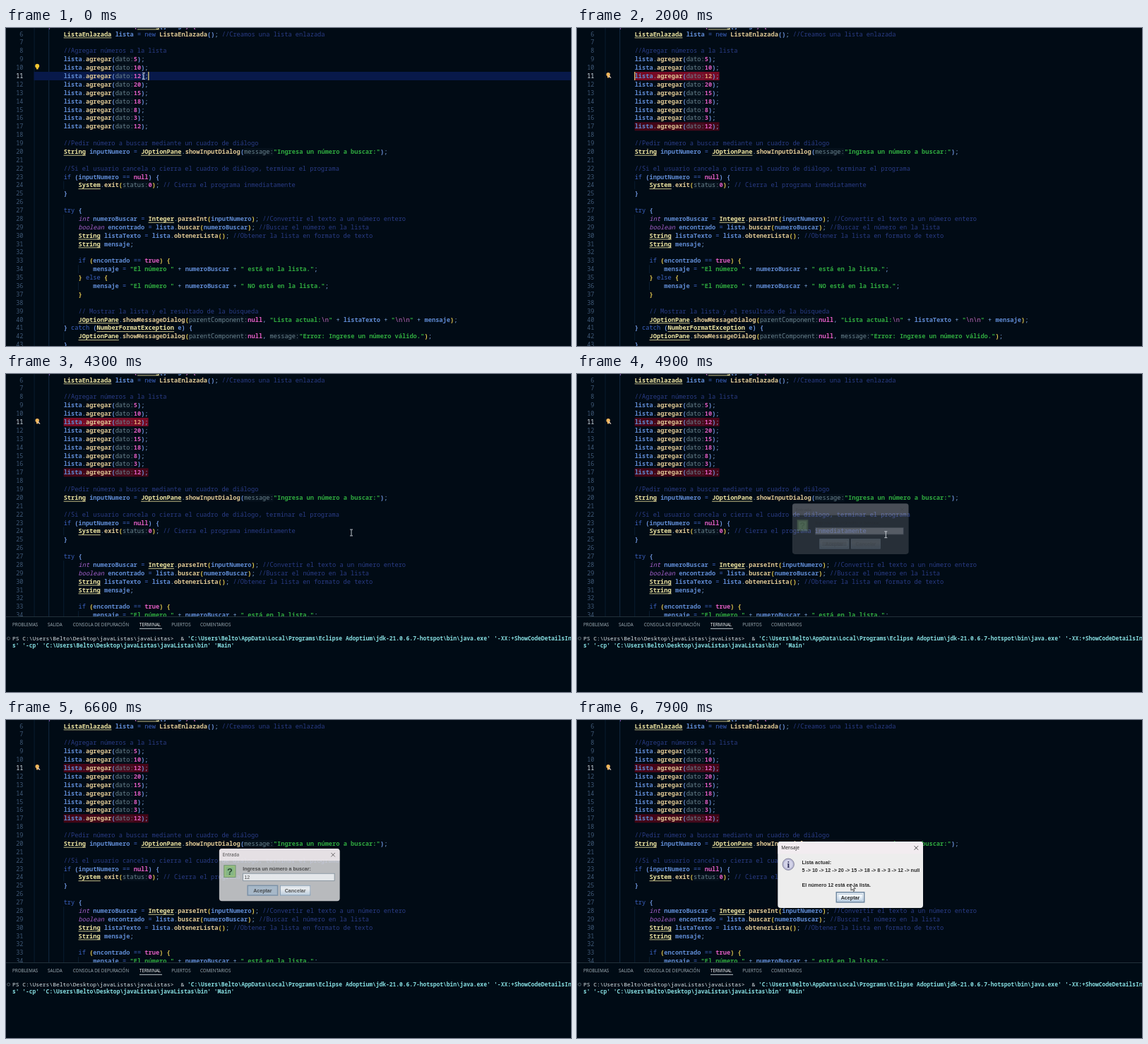
Write an HTML page with a canvas that moves like this. It is 800x450 px and loops after 8 s.

```html
<!DOCTYPE html>
<html lang="es">
<head>
<meta charset="utf-8">
<title>Lista enlazada</title>
<style>
html, body { margin: 0; width: 100%; height: 100%; overflow: hidden; background: #010b15; }
canvas { display: block; width: 800px; height: 450px; }
</style>
</head>
<body>
<canvas id="stage" width="800" height="450"></canvas>
<script>
const ctx = document.getElementById('stage').getContext('2d');
const LOOP = 8000, CW = 5.213, LH = 11.88, LEFT = 60.8, FIRST = 5;
const MONO = '"Noto Sans Mono", "DejaVu Sans Mono", monospace';
const UI = '"Open Sans", "Noto Sans", sans-serif';
const ARIAL = '"Liberation Sans", Arial, sans-serif';

const C = {
  comment: '#2a3c86', str: '#2fa83f', esc: '#c66fc4', hint: '#6b8590', num: '#dd5cc0',
  kw: '#3c62c0', type: '#f0e6a2', decl: '#a862cf', fn: '#dfc794', name: '#5f8ad2',
  op: '#7ba6dd', brackets: ['#e8cd50', '#d070cc', '#6f97e0']
};

// Inlay hints sit between « and ».
const code = `public static void main(String[] args) {
    ListaEnlazada lista = new ListaEnlazada(); //Creamos una lista enlazada

    //Agregar números a la lista
    lista.agregar(«dato:»5);
    lista.agregar(«dato:»10);
    lista.agregar(«dato:»12);
    lista.agregar(«dato:»20);
    lista.agregar(«dato:»15);
    lista.agregar(«dato:»18);
    lista.agregar(«dato:»8);
    lista.agregar(«dato:»3);
    lista.agregar(«dato:»12);

    //Pedir número a buscar mediante un cuadro de diálogo
    String inputNumero = JOptionPane.showInputDialog(«message:»"Ingresa un número a buscar:");

    //Si el usuario cancela o cierra el cuadro de diálogo, terminar el programa
    if (inputNumero == null) {
        System.exit(«status:»0); // Cierra el programa inmediatamente
    }

    try {
        int numeroBuscar = Integer.parseInt(inputNumero); //Convertir el texto a un número entero
        boolean encontrado = lista.buscar(numeroBuscar); //Buscar el número en la lista
        String listaTexto = lista.obtenerLista(); //Obtener la lista en formato de texto
        String mensaje;

        if (encontrado == true) {
            mensaje = "El número " + numeroBuscar + " está en la lista.";
        } else {
            mensaje = "El número " + numeroBuscar + " NO está en la lista.";
        }

        // Mostrar la lista y el resultado de la búsqueda
        JOptionPane.showMessageDialog(«parentComponent:»null, "Lista actual:\\n" + listaTexto + "\\n\\n" + mensaje);
    } catch (NumberFormatException e) {
        JOptionPane.showMessageDialog(«parentComponent:»null, «message:»"Error: Ingrese un número válido.");
    }`.split('\n');

function kind(s, next) {
  if (s.startsWith('//')) return 'comment';
  if (s[0] === '«') return 'hint';
  if (s[0] === '\\') return 'esc';
  if (/^\d|^(null|true)$/.test(s)) return 'num';
  if (/^(new|try|catch|if|else|=)$/.test(s)) return 'kw';
  if (/^(int|boolean|public|static|void)$/.test(s)) return 'decl';
  if (/^\w/.test(s)) return next === '(' ? 'fn' : /^[A-Z]/.test(s) ? 'type' : 'name';
  return /[(){}[\]]/.test(s) ? 'bracket' : 'op';
}

let depth = 1;
function tokenize(line) {
  const out = [];
  let col = 0, quoted = false;
  for (const m of line.matchAll(/\/\/.*|«[^»]*»|\\n|"|[\wáéíóúñ]+|\s+|./g)) {
    const raw = m[0], s = raw.replace(/[«»]/g, '');
    let k = kind(raw, line[m.index + raw.length]);
    if (raw === '"') { k = 'str'; quoted = !quoted; }
    else if (quoted && k !== 'esc') k = 'str';
    let color = C[k];
    if (k === 'bracket') {
      if (/[)}\]]/.test(s)) depth--;
      color = C.brackets[depth % 3];
      if (/[({[]/.test(s)) depth++;
    }
    const last = out[out.length - 1];
    if (last && k === 'str' && last.k === 'str') last.s += s;
    else if (s.trim()) out.push({ s, k, col, color });
    col += s.length;
  }
  return out;
}
const rows = code.map(tokenize);

const clamp = (v, a = 0, b = 1) => Math.min(b, Math.max(a, v));
const ease = p => p * p * (3 - 2 * p);
const ramp = (t, a, b) => ease(clamp((t - a) / (b - a)));
const lineY = n => 8.6 + (n - 6) * LH;

function rect(x, y, w, h, fill) { ctx.fillStyle = fill; ctx.fillRect(x, y, w, h); }
function text(s, x, y, font, fill, align = 'left') {
  ctx.font = font; ctx.fillStyle = fill; ctx.textAlign = align;
  ctx.fillText(s, x, y);
}
function path(points, stroke, width = 1, fill) {
  ctx.beginPath();
  points.forEach(([x, y], i) => i ? ctx.lineTo(x, y) : ctx.moveTo(x, y));
  if (fill) { ctx.closePath(); ctx.fillStyle = fill; ctx.fill(); }
  ctx.strokeStyle = stroke; ctx.lineWidth = width; ctx.stroke();
}
function circle(x, y, r, fill, stroke) {
  ctx.beginPath(); ctx.arc(x, y, r, 0, 7);
  if (fill) { ctx.fillStyle = fill; ctx.fill(); }
  if (stroke) { ctx.strokeStyle = stroke; ctx.lineWidth = 0.8; ctx.stroke(); }
}

function bulb(y, fix) {
  const fill = fix ? '#efb45a' : '#f2c531';
  circle(44.2, y - 1.3, fix ? 2.7 : 3, fill);
  rect(43, y + 1, 2.6, 2.4, fill);
  if (fix) path([[44.8, y + 0.2], [48, y + 3.6]], '#e9d3c4', 1.3);
}

function guides() {
  rect(39.6, 0, 0.9, 450, '#0b2034');
  rect(60.3, 0, 0.9, 450, '#16304a');
  const span = (x, a, b) => rect(x, lineY(a) - LH / 2, 0.8, (b - a + 1) * LH, '#0d2237');
  span(81.4, 24, 24); span(81.4, 28, 40); span(81.4, 42, 42);
  span(102.2, 34, 34); span(102.2, 36, 36);
}

function editor(t) {
  const x0 = LEFT + 4 * CW, x1 = x0 + 23 * CW;
  const cols = Math.round(23 * ramp(t, 200, 550));
  const y11 = lineY(11) - 6, focused = t < 4900;
  guides();
  if (!cols) {
    rect(39.6, y11, 760.4, 12, '#08194a');
  } else {
    rect(x1 - cols * CW, y11, cols * CW, 12, focused ? '#770a24' : '#470518');
    if (cols === 23) rect(x0, lineY(17) - 6, x1 - x0, 12, '#430517');
  }
  rows.forEach((row, i) => {
    const n = i + FIRST, y = lineY(n) + 3;
    text(n, 24.5, y, '8.6px ' + MONO, n === 11 ? '#e4ecf4' : '#3f5876', 'right');
    for (const { s, k, col, color } of row) {
      const x = LEFT + col * CW, w = s.length * CW;
      if (k === 'hint') rect(x, y - 8, w, 10.5, 'rgba(100,140,160,.05)');
      const style = k === 'decl' ? 'italic ' : /type|fn|name|num|bracket|str/.test(k) ? 'bold ' : '';
      const lit = n === 11 && k === 'num' && cols && focused;
      text(s, x, y, style + '8.68px ' + MONO, lit ? '#dba074' : color);
      if (k === 'type') rect(x, y + 1.8, w, 0.9, '#d8cf92');
    }
  });
  bulb(cols ? 67 : 55, cols > 0);
  if (!cols) rect(x1 - 0.3, y11, 1.2, 12, '#e8d47a');
  else if (focused && (t < 550 || Math.floor((t - 550) / 530) % 2 === 0))
    rect(x1 - cols * CW - 0.5, y11, 1.2, 12, '#e8d47a');
}

const tabs = [['PROBLEMAS', 9], ['SALIDA', 59], ['CONSOLA DE DEPURACIÓN', 94.7],
  ['TERMINAL', 189], ['PUERTOS', 234.3], ['COMENTARIOS', 275]];

function panel(t) {
  if (t < 2800) return;
  rect(0, 343, 800, 107, '#000b15');
  rect(0, 343, 800, 0.9, '#27363f');
  for (const [s, x] of tabs)
    text(s, x, 356.7, '6.25px ' + UI, s === 'TERMINAL' ? '#ffffff' : '#a3b0b8');
  rect(189, 359.8, 32, 0.9, '#d5dde2');
  if (t < 3700) return;
  const font = '7.95px ' + MONO, w = 4.77, home = 'C:\\Users\\Belto\\';
  circle(3.6, 374.2, 2, null, '#66747c');
  text('PS ' + home + 'Desktop\\javaListas\\javaListas>', 9, 377, font, '#dbe4e8');
  if (t < 3900) { rect(9 + 49 * w, 369.5, 4.5, 9, '#9fb0b8'); return; }
  const run = (s, col, y) => text(s, 9 + col * w, y, 'bold ' + font, '#86dde0');
  text('&', 9 + 50 * w, 377, font, '#dbe4e8');
  run("'" + home + "AppData\\Local\\Programs\\Eclipse Adoptium\\jdk-21.0.6.7-hotspot\\bin\\java.exe'", 52, 377);
  run("'-XX:+ShowCodeDetailsInExceptionMessage", 143, 377);
  run("s' '-cp' '" + home + "Desktop\\javaListas\\javaListas\\bin' 'Main'", 0, 387);
}

function windowBox(x, y, w, h, title) {
  ctx.beginPath(); ctx.roundRect(x, y, w, h, 4);
  ctx.fillStyle = '#ededed'; ctx.fill();
  ctx.save(); ctx.clip();
  rect(x, y, w, 17.5, '#f2ecf0');
  ctx.restore();
  text(title, x + 5, y + 11.3, '6.5px ' + UI, '#111');
  const cx = x + w - 9.7, cy = y + 9;
  path([[cx - 2.8, cy - 2.8], [cx + 2.8, cy + 2.8]], '#222', 0.8);
  path([[cx + 2.8, cy - 2.8], [cx - 2.8, cy + 2.8]], '#222', 0.8);
}

function button(label, x, y, w, main, pressed) {
  const g = ctx.createLinearGradient(0, y, 0, y + 15);
  g.addColorStop(0, '#dfeaf4'); g.addColorStop(0.35, '#f6fafd'); g.addColorStop(1, '#b8cfe5');
  rect(x, y, w, 15, pressed ? '#a3b8cc' : g);
  ctx.strokeStyle = '#7088a0'; ctx.lineWidth = main ? 1.5 : 0.9;
  ctx.strokeRect(x + 0.5, y + 0.5, w - 1, 14);
  if (main) { ctx.strokeStyle = '#a4b8cb'; ctx.lineWidth = 0.6; ctx.strokeRect(x + 3, y + 3, w - 6, 9); }
  text(label, x + w / 2, y + 10.2, 'bold 7.15px ' + ARIAL, '#2a2a2a', 'center');
}

// Draws inside a fading, slightly shrinking frame centred on (cx, cy).
function faded(alpha, scale, cx, cy, draw) {
  ctx.save();
  ctx.globalAlpha = alpha;
  ctx.translate(cx, cy); ctx.scale(scale, scale); ctx.translate(-cx, -cy);
  draw();
  ctx.restore();
}

function inputDialog(t) {
  if (t < 4850 || t >= 6700) return;
  const shown = ramp(t, 4850, 5050), gone = clamp((t - 6520) / 180);
  faded(shown * (1 - 0.5 * gone), (0.94 + 0.06 * shown) * (1 - 0.035 * gone), 387.2, 219, () => {
    windowBox(300.5, 181.3, 173.5, 75.5, 'Entrada');
    rect(307, 205, 17.5, 18, '#568a5c');
    rect(308, 206, 15.5, 16, '#a6cb84');
    rect(310, 208, 11.5, 12, '#80b588');
    text('?', 315.8, 218.8, 'bold 13px ' + ARIAL, '#10261a', 'center');
    text('Ingresa un número a buscar:', 334.5, 212.8, 'bold 7.15px ' + ARIAL, '#2a2a2a');
    rect(334.3, 216.8, 132.5, 11.2, '#7a8a99');
    rect(335.2, 217.7, 130.7, 9.4, '#fff');
    const typed = t < 5400 ? '' : t < 5750 ? '1' : '12';
    text(typed, 336.6, 225.3, '7.15px ' + ARIAL, '#222');
    if (t < 6400 && Math.floor((t - 4900) / 500) % 2 === (t < 5400 ? 0 : 1))
      rect(337 + typed.length * 3.98, 218.6, 0.8, 8, '#222');
    button('Aceptar', 341, 234, 44, true, t > 6400);
    button('Cancelar', 388, 234, 44);
  });
}

function messageDialog(t) {
  if (t < 6700) return;
  const p = ramp(t, 6700, 6950), font = 'bold 7.15px ' + ARIAL;
  faded(p, 0.94 + 0.06 * p, 387, 219, () => {
    windowBox(284.3, 172, 205.7, 94, 'Mensaje');
    circle(299.2, 204.2, 8.2, '#b9b9d6', '#77778f');
    circle(299.2, 204.2, 6.2, '#d3d3e8');
    text('i', 299.2, 208.8, 'bold 13px "Liberation Serif", serif', '#2c2c58', 'center');
    text('Lista actual:', 318.4, 203.6, font, '#2a2a2a');
    text('5 -> 10 -> 12 -> 20 -> 15 -> 18 -> 8 -> 3 -> 12 -> null', 318.4, 214.6, font, '#2a2a2a');
    text('El número 12 está en la lista.', 318.4, 236.4, font, '#2a2a2a');
    button('Aceptar', 366.8, 243.3, 40.4, true);
  });
}

// time, x, y
const track = [[0, 195, 68], [200, 201, 68], [550, 82, 68], [650, 85, 68], [1000, 245, 69],
  [1250, 250, 69], [1900, 600, -14], [2700, 600, -14], [3000, 549, 164], [3500, 520, 200],
  [4200, 489, 224.5], [4500, 489, 224.5], [5300, 386, 230], [5800, 386, 230],
  [6300, 366, 238], [6650, 366, 238], [7500, 388, 232], [8000, 388, 232]];

function pointer(t) {
  // Hidden while one dialog gives way to the next.
  if (t > 6520 && t < 6700) return;
  const i = track.findIndex(k => k[0] > t), a = track[i - 1], b = track[i];
  const p = ramp(t, a[0], b[0]);
  const x = a[1] + (b[1] - a[1]) * p, y = a[2] + (b[2] - a[2]) * p;
  if (t < 4950) {
    const c = '#d4dae0';
    path([[x, y - 4], [x, y + 4]], c, 0.9);
    path([[x - 2, y - 4.4], [x + 2, y - 4.4]], c, 0.9);
    path([[x - 2, y + 4.4], [x + 2, y + 4.4]], c, 0.9);
  } else {
    const shape = [[0, 0], [0, 9.2], [2.1, 7.3], [3.5, 10.4], [4.9, 9.8], [3.5, 6.8], [6.3, 6.6]];
    path(shape.map(([u, v]) => [x + u, y + v]).concat([[x, y]]), '#222', 0.8, '#fff');
  }
}

function draw(t) {
  rect(0, 0, 800, 450, '#010b15');
  editor(t);
  panel(t);
  inputDialog(t);
  messageDialog(t);
  pointer(t);
}

function tick() {
  draw(performance.now() % LOOP);
  requestAnimationFrame(tick);
}
tick();
</script>
</body>
</html>
```
